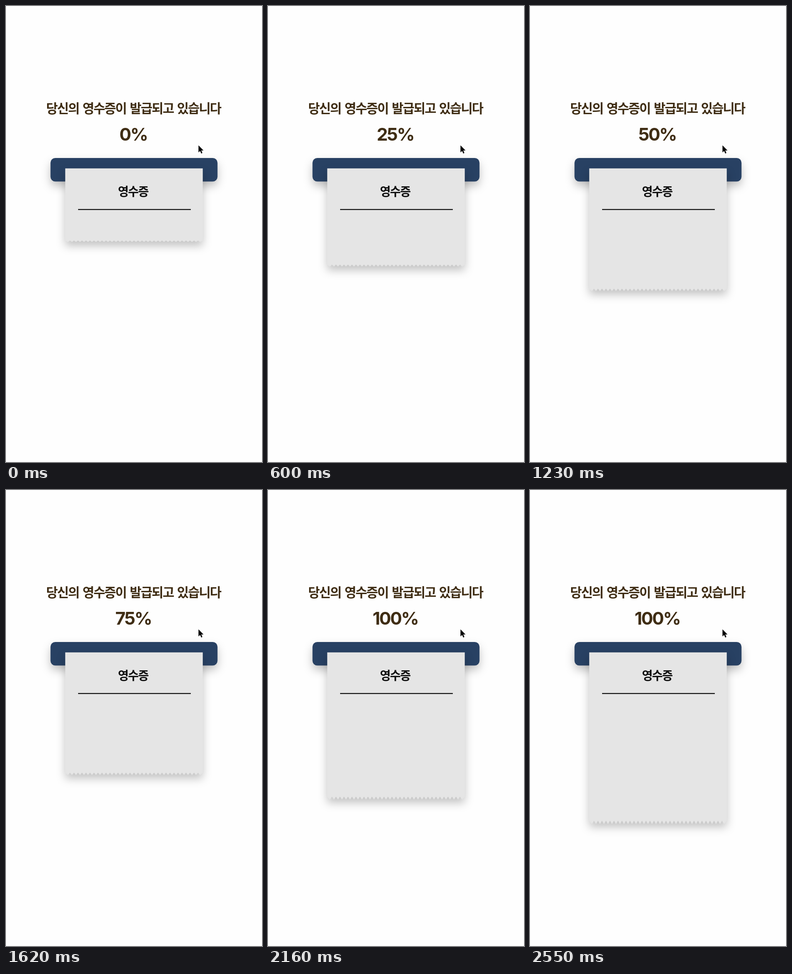
Recreate the animation shown at these times as an HTML page. Size 561 by 999 pixels, loop 2670 ms.

```html
<!DOCTYPE html>
<html lang="ko">
<head>
<meta charset="utf-8">
<title>영수증</title>
<style>
  html, body { margin: 0; width: 100%; height: 100%; overflow: hidden; background: #fefefe; }
  svg { display: block; width: 561px; height: 999px; }
  text { font-family: "Noto Sans CJK KR", "Noto Sans CJK", sans-serif; font-weight: 700; text-anchor: middle; }
  .korean { letter-spacing: -0.064em; word-spacing: 0.06em; }
  .brown { fill: #3f2d14; }
  #percent { font-family: Inter, "Noto Sans CJK KR", sans-serif; letter-spacing: -0.055em; }
  .shadow { fill: #000; fill-opacity: 0.24; filter: url(#blur); }
</style>
</head>
<body>
<svg viewBox="0 0 561 999">
  <defs>
    <filter id="blur" filterUnits="userSpaceOnUse" x="40" y="280" width="480" height="540" color-interpolation-filters="sRGB">
      <feGaussianBlur stdDeviation="9.6"/>
    </filter>
  </defs>

  <text class="korean brown" x="279.4" y="234.5" font-size="28">당신의 영수증이 발급되고 있습니다</text>
  <text id="percent" class="brown" x="279" y="295" font-size="38.7">0%</text>

  <rect class="shadow" x="97.5" y="343" width="366" height="51.5" rx="10.5"/>
  <rect x="97.5" y="333" width="366" height="51.5" rx="10.5" fill="#284163"/>

  <path id="paperShadow" class="shadow" transform="translate(0 10)"/>
  <path id="paper" fill="#e5e5e5"/>
  <text class="korean" x="278.4" y="415.8" font-size="25.8" fill="#0c0c0c">영수증</text>
  <rect x="158" y="444.8" width="247" height="2.1" fill="#0c0c0c"/>

  <path transform="translate(421.8 305.2)" d="M0 0V15.6L3.6 12.2L6.1 18L8.6 16.9L6.1 11.2H11Z"
        fill="#000" stroke="#fff" stroke-width="1.2" paint-order="stroke" stroke-linejoin="round"/>
</svg>

<script>
  const LOOP = 2670, STEP = 540, FEED_DELAY = 60;
  const LEFT = 129.8, TOP = 355.8, WIDTH = 301.4;
  const BASE_HEIGHT = 161.25, FEED = 53.75;
  const NOTCHES = 33;
  const byId = id => document.getElementById(id);

  // The torn edge takes up the last 2% of the paper's height.
  function paperPath(height) {
    const points = [[0, 0], [100, 0], [100, 98]];
    for (let i = 0; i <= 2 * NOTCHES; i++) {
      points.push([98 - 48 * i / NOTCHES, i % 2 ? 98 : 100]);
    }
    points.push([0, 98]);
    const place = ([x, y]) =>
      (LEFT + WIDTH * x / 100).toFixed(2) + " " + (TOP + height * y / 100).toFixed(2);
    return "M" + points.map(place).join("L") + "Z";
  }

  let shownCount = -1, shownFeed = -1;

  function draw() {
    const t = performance.now() % LOOP;
    const count = Math.floor(t / STEP);
    const feed = Math.max(0, Math.floor((t - FEED_DELAY) / STEP));
    if (count !== shownCount) {
      byId("percent").textContent = count * 25 + "%";
      shownCount = count;
    }
    if (feed !== shownFeed) {
      const path = paperPath(BASE_HEIGHT + FEED * feed);
      byId("paper").setAttribute("d", path);
      byId("paperShadow").setAttribute("d", path);
      shownFeed = feed;
    }
    requestAnimationFrame(draw);
  }
  draw();
</script>
</body>
</html>
```
